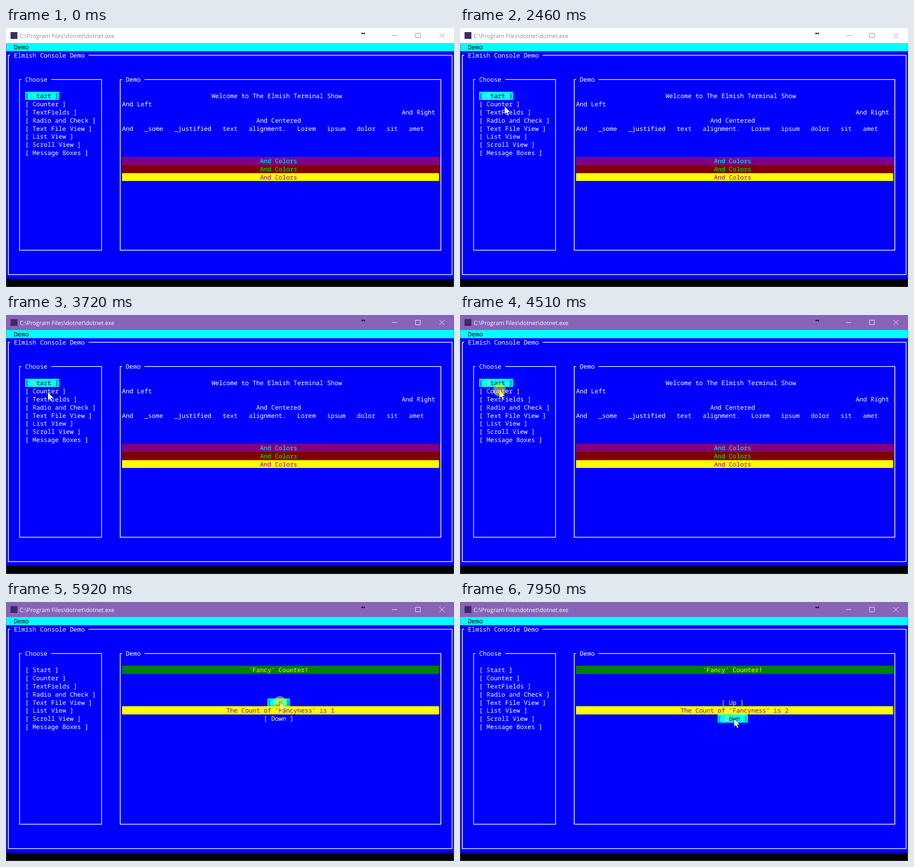
Write an HTML page that moves like this. It is 984 px wide and 569 px high and loops after 8000 ms.

```html
<!DOCTYPE html>
<html lang="en">
<head>
<meta charset="utf-8">
<title>Console demo</title>
<style>
html, body { margin: 0; width: 100%; height: 100%; overflow: hidden; background: #00f; }
#stage { position: absolute; left: 0; top: 0; width: 984px; height: 569px; overflow: hidden; background: #00f; }
#stage * { animation-duration: 8s; animation-iteration-count: infinite; animation-timing-function: step-end; }

/* Title bar */
.bar { position: absolute; left: 0; top: 0; width: 984px; height: 33px; background: #fff; color: #8f8f8f; animation-name: bar; }
.bar span { position: absolute; left: 30px; top: 8px; font: 12.7px/18px "Open Sans", "Noto Sans", sans-serif; white-space: pre; text-rendering: geometricPrecision; }
.bar i { position: absolute; left: 10px; top: 9px; width: 15px; height: 15px; background: #3f2a68; }
svg { position: absolute; left: 0; top: 0; fill: none; overflow: visible; }

/* Character grid: 8.19 x 17.85 px cells */
p, .caret, .strip {
  position: absolute; margin: 0;
  left: calc(1px + var(--c) * 8.19px);
  top: calc(33px + var(--r) * 17.85px);
}
p, .strip {
  height: 17.85px; color: #fff; white-space: pre;
  font: 13.65px/17.85px "Noto Sans Mono", "DejaVu Sans Mono", monospace;
  text-rendering: geometricPrecision;
}
p b { font-weight: normal; color: #ff0; }
.menu { left: 0; width: 984px; background: #0ff; color: #000; }
.on { background: #0ff; color: #000; }
.fill { width: 696.15px; }
.purple { background: #800080; color: #0ff; }
.maroon { background: #800000; color: #0f0; }
.yellow { background: #ff0; color: #800080; }
.green { background: #008000; color: #ff0; }
.strip { width: 8.19px; overflow: hidden; color: #800080; }
.strip span { display: block; animation-name: count; }
.caret { width: 8.19px; height: 4.6px; margin-top: 13.2px; background: #f00; opacity: 0; }
.foot { position: absolute; left: 0; top: 550.5px; width: 984px; height: 18px; background: #000; }
.edge { position: absolute; inset: 33px 0 0 0; border: 1px solid #6d6d8c; border-top: 0; opacity: .6; }

.start { animation-name: start; }
.counter { opacity: 0; animation-name: counter; }
.f-count { opacity: 0; animation-name: f-count; }
.f-up { opacity: 0; animation-name: f-up; }
.f-down { opacity: 0; animation-name: f-down; }
.c-start { animation-name: c-start; }
.c-up { animation-name: c-up; }
.mouse { position: absolute; left: 0; top: 0; animation-name: move; }
.press { opacity: 0; animation-name: press; }

@keyframes bar { 34.75%, 100% { background: #8764b8; color: #fff; } }
@keyframes start { 0% { opacity: 1; } 58.25%, 100% { opacity: 0; } }
@keyframes counter { 0% { opacity: 0; } 58.25%, 100% { opacity: 1; } }
@keyframes f-count { 0% { opacity: 0; } 58.25% { opacity: 1; } 72.06%, 100% { opacity: 0; } }
@keyframes f-up { 0% { opacity: 0; } 72.06% { opacity: 1; } 99.375%, 100% { opacity: 0; } }
@keyframes f-down { 0% { opacity: 0; } 99.375%, 100% { opacity: 1; } }
@keyframes c-start {
  0%, 40.625%, 54.25%, 100% { opacity: 0; }
  34.75%, 48.375% { opacity: 1; }
}
@keyframes c-up {
  0%, 77.875%, 91.5%, 100% { opacity: 0; }
  72.06%, 85.625% { opacity: 1; }
}
@keyframes press {
  0%, 38.625%, 58.25%, 72.06%, 77.875%, 99.375%, 100% { opacity: 0; }
  34.75%, 54.25%, 70.06%, 74%, 97.25% { opacity: 1; }
}
@keyframes count {
  0% { transform: none; }
  72.06% { transform: translateY(-17.85px); }
  77.875% { transform: translateY(-35.7px); }
  81.625% { transform: translateY(-53.55px); }
  99.375%, 100% { transform: translateY(-35.7px); }
}
@keyframes move {
  0% { transform: translate(760px, 620px); }
  5.375% { transform: translate(755px, 548px); }
  7.25% { transform: translate(199px, 350px); }
  11.125% { transform: translate(180px, 290px); }
  13.125% { transform: translate(166px, 226px); }
  15.125% { transform: translate(161.5px, 208.5px); }
  20.875% { transform: translate(159px, 207px); }
  22.875% { transform: translate(150px, 200px); }
  24.8% { transform: translate(136px, 190px); }
  26.75% { transform: translate(120px, 182px); }
  28.75% { transform: translate(107px, 176px); }
  30.7% { transform: translate(98px, 172px); }
  32.625% { transform: translate(94px, 171px); }
  34.75% { transform: translate(92px, 169.5px); }
  48.375% { transform: translate(90px, 168px); }
  52.375% { transform: translate(88px, 166px); }
  54.25% { transform: translate(86.5px, 165px); }
  58.25% { transform: translate(220.5px, 209.5px); }
  60.125% { transform: translate(290px, 216px); }
  62.25% { transform: translate(370px, 219px); }
  64.2% { transform: translate(450px, 221px); }
  66.1% { transform: translate(520px, 222px); }
  68.1% { transform: translate(570px, 222px); }
  70.06% { transform: translate(594px, 222px); }
  72.06% { transform: translate(601.5px, 221px); }
  85.625% { transform: translate(602px, 226px); }
  87.56% { transform: translate(602px, 238px); }
  89.56% { transform: translate(602px, 250px); }
  91.5% { transform: translate(602px, 259px); }
  93.5%, 100% { transform: translate(602px, 256.5px); }
}
</style>
</head>
<body>
<div id="stage">
  <div class="bar">
    <i></i>
    <span>C:\Program Files\dotnet\dotnet.exe</span>
    <svg width="984" height="33">
      <path d="M848 16.5H859M899.5 11.5H910V21.5H899.5ZM952 11L963 22M963 11L952 22" stroke="currentColor"/>
      <path d="M782 12H787" stroke="#000" stroke-width="1.3"/>
      <path d="M780 12L783 9.5V14.5ZM789 12L786 9.5V14.5Z" fill="#000"/>
    </svg>
  </div>

  <p class="menu" style="--r:0"><span style="margin-left:17.4px">Demo</span></p>
  <svg width="984" height="569" stroke="#fff" stroke-width="1.6">
    <path d="M9.2 59.8H5.1V541.7H979.7V59.8H181.2"/>
    <path d="M33.8 113.3H29.7V488.2H209.8V113.3H99.3"/>
    <path d="M254.9 113.3H250.8V488.2H955.1V113.3H304"/>
  </svg>
  <p style="--r:1;--c:2">Elmish Console Demo</p>
  <p style="--r:4;--c:5">Choose</p>
  <p style="--r:4;--c:32">Demo</p>

  <p style="--r:6;--c:5">[ <b>S</b>tart ]</p>
  <p style="--r:7;--c:5">[ <b>C</b>ounter ]</p>
  <p style="--r:8;--c:5">[ <b>T</b>extFields ]</p>
  <p style="--r:9;--c:5">[ <b>R</b>adio and Check ]</p>
  <p style="--r:10;--c:5">[ <b>T</b>ext File View ]</p>
  <p style="--r:11;--c:5">[ <b>L</b>ist View ]</p>
  <p style="--r:12;--c:5">[ <b>S</b>croll View ]</p>
  <p style="--r:13;--c:5">[ <b>M</b>essage Boxes ]</p>

  <div class="start">
    <p class="on" style="--r:6;--c:5">[ <b>S</b>tart ]</p>
    <p style="--r:6;--c:55">Welcome to The Elmish Terminal Show</p>
    <p style="--r:7;--c:31">And Left</p>
    <p style="--r:8;--c:106">And Right</p>
    <p style="--r:9;--c:67">And Centered</p>
    <p style="--r:10;--c:31">And   _some   _justified   text   alignment.   Lorem   ipsum   dolor   sit   amet</p>
    <p class="fill purple" style="--r:14;--c:31"></p>
    <p class="fill maroon" style="--r:15;--c:31"></p>
    <p class="fill yellow" style="--r:16;--c:31"></p>
    <p class="purple" style="--r:14;--c:68">And Colors</p>
    <p class="maroon" style="--r:15;--c:68">And Colors</p>
    <p class="yellow" style="--r:16;--c:68">And Colors</p>
    <div class="caret c-start" style="--r:6;--c:7"></div>
  </div>

  <div class="counter">
    <p class="on f-count" style="--r:7;--c:5">[ <b>C</b>ounter ]</p>
    <p class="fill green" style="--r:6;--c:31"></p>
    <p class="green" style="--r:6;--c:65">'Fancy' Counter!</p>
    <p style="--r:10;--c:70">[ <b>U</b>p ]</p>
    <p class="on f-up" style="--r:10;--c:70">[ <b>U</b>p ]</p>
    <p class="fill yellow" style="--r:11;--c:31"></p>
    <p class="yellow" style="--r:11;--c:59">The Count of 'Fancyness' is </p>
    <div class="strip" style="--r:11;--c:87"><span>0<br>1<br>2<br>3</span></div>
    <p style="--r:12;--c:69">[ <b>D</b>own ]</p>
    <p class="on f-down" style="--r:12;--c:69">[ <b>D</b>own ]</p>
    <div class="caret c-up" style="--r:10;--c:72"></div>
  </div>

  <div class="foot"></div>
  <div class="edge"></div>

  <div class="mouse">
    <svg width="30" height="30">
      <path d="M0 0V17.6L4 13.9L6.6 20.4L9.6 19.2L6.9 12.9H12.5Z" fill="#fff" stroke="#000" stroke-width=".5"/>
      <circle class="press" r="14" fill="#ff0" fill-opacity=".5"/>
    </svg>
  </div>
</div>
</body>
</html>
```
